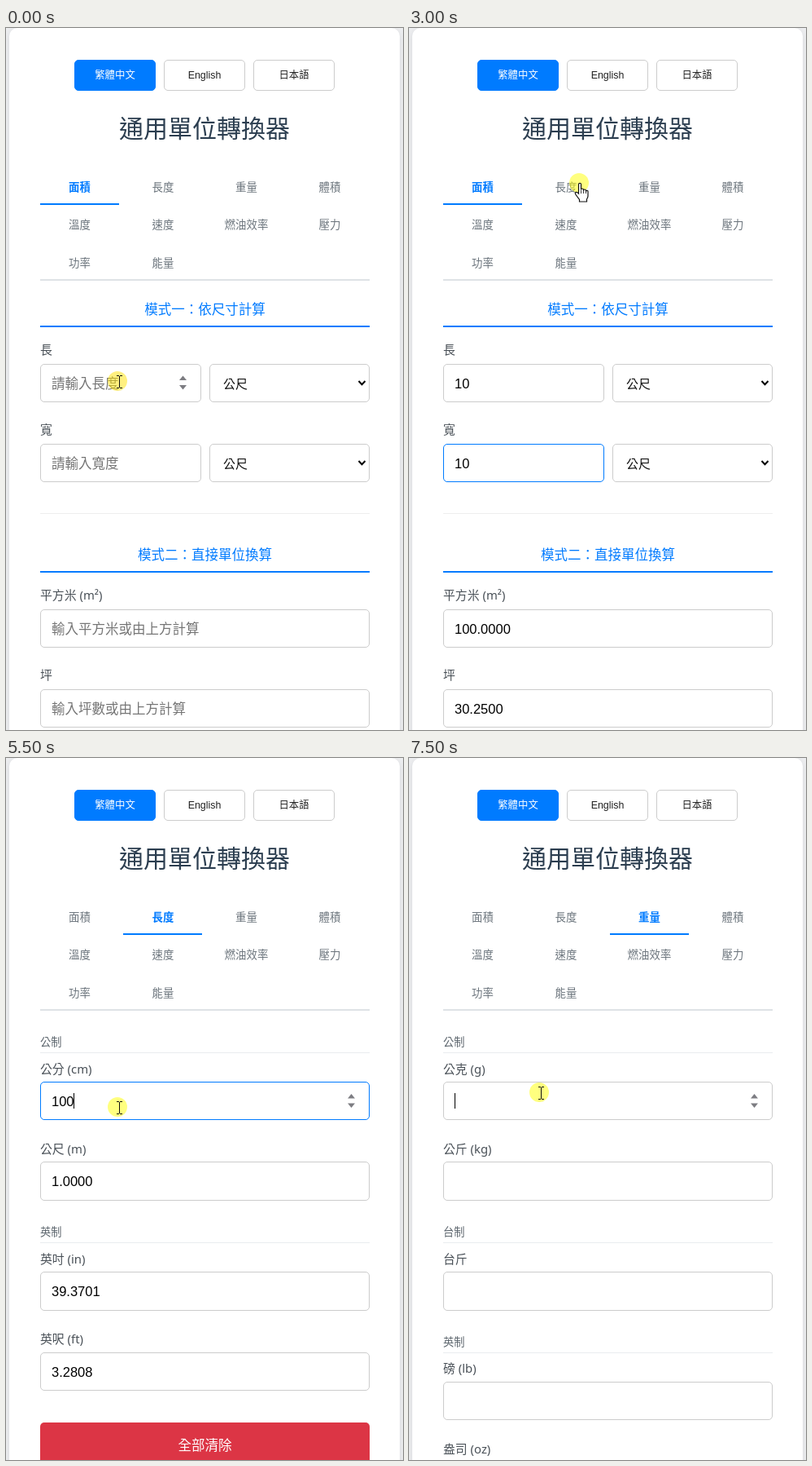
Write an HTML page with a canvas that moves like this. It is 488 by 861 pixels and loops after 8000 ms.

```html
<!DOCTYPE html>
<html lang="zh-Hant">
<head>
<meta charset="utf-8">
<title>通用單位轉換器</title>
<style>
html, body { margin: 0; width: 100%; height: 100%; overflow: hidden; background: #eeeff1; }
#stage { position: absolute; left: 0; top: 0; width: 488px; height: 861px; overflow: hidden; }
#card { position: absolute; left: 4px; top: 0; width: 480px; height: 900px; background: #fff;
  border-radius: 10px; box-shadow: 0 2px 10px rgba(0, 0, 0, .1); }
#page, canvas { position: absolute; left: 0; top: 0; width: 488px; height: 861px; }
#page div { position: absolute; box-sizing: border-box; }
#page .t { line-height: 30px; height: 30px; white-space: pre;
  font-family: "Noto Sans", "Noto Sans CJK TC", "Noto Sans CJK JP", "Noto Sans CJK", sans-serif; }
#page .n { font-family: "Liberation Sans", Arial, sans-serif; }
</style>
</head>
<body>
<div id="stage">
  <div id="card"></div>
  <div id="page"></div>
  <canvas width="488" height="861"></canvas>
</div>
<script>
const page = document.getElementById('page');
const ctx = document.querySelector('canvas').getContext('2d');
const BLUE = '#007bff', GREY = '#6c757d', LABEL = '#495057', LINE = '#ccc';
const STEP = 500, LOOP = 8000;
const NUM_FONT = '16.5px "Liberation Sans", Arial, sans-serif';

// One entry per half second. f: field with caret, hot: blue border, spin: field with spinner.
const steps = [
  { tab: 0, v: ['', ''], spin: 0, at: [139, 434], disc: '#ffe100' },
  { tab: 0, v: ['1', ''], f: 0, hot: 0, spin: 0, at: [139, 434] },
  { tab: 0, v: ['10', ''], f: 0, hot: 0, spin: 0, at: [139, 434] },
  { tab: 0, v: ['10', ''], f: 1, hot: 0, spin: 1, at: [102, 545], disc: '#ff0' },
  { tab: 0, v: ['10', '1'], f: 1, hot: 1, spin: 1, at: [102, 545] },
  { tab: 0, v: ['10', '10'], f: 1, hot: 1, spin: 1, at: [102, 545] },
  { tab: 0, v: ['10', '10'], hot: 1, at: [210, 190], disc: '#ff0', hand: true },
  { tab: 1, v: [''], f: 0, spin: 0, at: [131, 430], disc: '#ff0' },
  { tab: 1, v: [''], f: 0, hot: 0, spin: 0, at: [131, 430] },
  { tab: 1, v: ['10'], f: 0, hot: 0, spin: 0, at: [131, 430] },
  { tab: 1, v: ['100'], f: 0, hot: 0, spin: 0, at: [131, 430] },
  { tab: 1, v: ['100'], f: 0, hot: 0, spin: 0, at: [139, 429], disc: '#ff0' },
  { tab: 1, v: ['6'], f: 0, hot: 0, spin: 0, at: [150, 443] },
  { tab: 1, v: ['60'], f: 0, hot: 0, spin: 0, at: [150, 443] },
  { tab: 1, v: ['60'], f: 0, hot: 0, spin: 0, at: [301, 196], disc: '#ff0', hand: true },
  { tab: 2, v: [''], f: 0, spin: 0, at: [162, 411], disc: '#ff0' }
];

function add(css, text, cls) {
  const el = document.createElement('div');
  el.style.cssText = css;
  if (text) el.textContent = text;
  if (cls) el.className = cls;
  page.appendChild(el);
}

function rect(x, y, w, h, css) {
  add(`left:${x}px;top:${y}px;width:${w}px;height:${h}px;${css}`);
}

function text(x, cy, size, str, color, weight = 400, cls = '') {
  add(`left:${x}px;top:${cy - 15}px;font-size:${size}px;color:${color};font-weight:${weight}`, str, 't ' + cls);
}

function mid(cx, cy, size, str, color, weight = 400, cls = '') {
  add(`left:${cx - 150}px;width:300px;text-align:center;top:${cy - 15}px;` +
    `font-size:${size}px;color:${color};font-weight:${weight}`, str, 't ' + cls);
}

const label = (cy, str) => text(42, cy, 14.86, str, LABEL, 500);

function field(y, w, h, value, hint, hot) {
  rect(42, y, w, h, `border:1px solid ${hot ? BLUE : LINE};border-radius:5px`);
  const cy = y + 23.5;
  if (value) text(56, cy, 16.5, value, '#000', 400, 'n');
  else if (hint) text(56, cy, 16.5, hint, '#757575');
}

function select(y) {
  rect(250, y, 197, 47, `border:1px solid ${LINE};border-radius:5px`);
  text(267, y + 23.5, 14.9, '公尺', '#111');
  ctx.strokeStyle = '#000';
  ctx.lineWidth = 2;
  ctx.beginPath();
  ctx.moveTo(433.5, y + 21);
  ctx.lineTo(437.5, y + 25.2);
  ctx.lineTo(441.5, y + 21);
  ctx.stroke();
}

function group(cy, str) {
  text(42, cy, 13.2, str, '#5c656d', 400);
  rect(42, cy + 13.5, 405, 1, 'background:#e9ecef');
}

function section(cy, str) {
  mid(244.5, cy, 16.5, str, BLUE, 500);
  rect(42, cy + 20, 405, 2, 'background:' + BLUE);
}

function header(tab) {
  ['繁體中文', 'English', '日本語'].forEach((name, i) => {
    const x = 84 + i * 110;
    rect(x, 39, 100, 38, `border:1px solid ${i ? LINE : BLUE};border-radius:5px;background:${i ? '#fff' : BLUE}`);
    mid(x + 50, 58, 12.4, name, i ? '#222' : '#fff', 400, i === 1 ? 'n' : '');
  });
  mid(244, 123, 30, '通用單位轉換器', '#2c3e50', 500);
  const names = '面積 長度 重量 體積 溫度 速度 燃油效率 壓力 功率 能量'.split(' ');
  names.forEach((name, i) => {
    const on = i === tab;
    mid(90.5 + i % 4 * 102.5, 195 + Math.floor(i / 4) * 46.4, 13.4, name, on ? BLUE : GREY, on ? 700 : 400);
  });
  rect(42, 308, 405, 2, 'background:#dee2e6');
  rect(42 + Math.round(tab * 102.4), 215, 97, 2, 'background:' + BLUE);
}

const fixed = (n) => n ? n.toFixed(4) : '';

function area(s) {
  const size = s.v[0] * s.v[1];
  section(345, '模式一：依尺寸計算');
  label(394, '長');
  field(412, 198, 47, s.v[0], '請輸入長度', s.hot === 0);
  select(412);
  label(492, '寬');
  field(510, 198, 47, s.v[1], '請輸入寬度', s.hot === 1);
  select(510);
  rect(42, 595, 405, 1, 'background:#eee');
  section(646, '模式二：直接單位換算');
  label(695, '平方米 (m²)');
  field(713, 405, 47, fixed(size), '輸入平方米或由上方計算');
  label(793, '坪');
  field(811, 405, 47, fixed(size * 0.3025), '輸入坪數或由上方計算');
}

function metric(s, small, large) {
  group(347.5, '公制');
  label(380.5, small);
  field(397, 405, 47, s.v[0], '', s.hot === 0);
  label(478.5, large);
}

function distance(s) {
  const cm = +s.v[0];
  metric(s, '公分 (cm)', '公尺 (m)');
  field(495, 405, 48, fixed(cm / 100));
  group(580.5, '英制');
  label(613.5, '英吋 (in)');
  field(630, 405, 48, fixed(cm / 2.54));
  label(711.5, '英呎 (ft)');
  field(729, 405, 47, fixed(cm / 30.48));
  rect(42, 815, 405, 60, 'background:#dc3545;border-radius:5px');
  mid(244.5, 843, 16.5, '全部清除', '#fff', 500);
}

function weight(s) {
  metric(s, '公克 (g)', '公斤 (kg)');
  field(495, 405, 48);
  group(580.5, '台制');
  label(613.5, '台斤');
  field(630, 405, 48);
  group(715.5, '英制');
  label(747.5, '磅 (lb)');
  field(765, 405, 47);
  label(846.5, '盎司 (oz)');
}

function spinner(x, cy) {
  ctx.fillStyle = '#7d7d82';
  for (const d of [-1, 1]) {
    ctx.beginPath();
    ctx.moveTo(x - 4.5, cy + d * 3);
    ctx.lineTo(x + 4.5, cy + d * 3);
    ctx.lineTo(x, cy + d * 8.5);
    ctx.fill();
  }
}

function caret(str, cy) {
  ctx.font = NUM_FONT;
  ctx.fillStyle = '#000';
  ctx.fillRect(Math.floor(56 + ctx.measureText(str).width), Math.round(cy - 9.5), 1, 19);
}

function beam(x, y) {
  ctx.fillStyle = '#111';
  ctx.fillRect(x, y - 7, 1, 14);
  for (const dy of [-8, 7]) {
    ctx.fillRect(x - 3, y + dy, 3, 1);
    ctx.fillRect(x + 1, y + dy, 3, 1);
  }
}

const handPath = new Path2D('M-1.5 13V1.7Q-1.5 .3 0 .3T1.5 1.7V8.5Q1.5 7 3 7T4.5 8.5V9.5' +
  'Q4.5 8 6 8T7.5 9.5V10.5Q7.5 9.3 8.8 9.3T10 10.8V16Q10 18 8.5 20V23H-.5V20.5' +
  'L-5.3 14Q-6.3 12.5 -5 11.6Q-3.5 11 -1.5 13Z');

function pointer(s) {
  const [x, y] = s.at;
  if (s.disc) {
    ctx.globalAlpha = 0.5;
    ctx.fillStyle = s.disc;
    ctx.beginPath();
    ctx.arc(s.hand ? x - 1 : x - 2, s.hand ? y : y - 1, 12, 0, 7);
    ctx.fill();
    ctx.globalAlpha = 1;
  }
  if (!s.hand) return beam(x, y);
  ctx.save();
  ctx.translate(x, y);
  ctx.fillStyle = '#fff';
  ctx.strokeStyle = '#111';
  ctx.lineWidth = 1.2;
  ctx.fill(handPath);
  ctx.stroke(handPath);
  ctx.beginPath();
  for (const kx of [1.5, 4.5, 7.5]) {
    ctx.moveTo(kx, 9);
    ctx.lineTo(kx, 13);
  }
  ctx.lineWidth = 0.8;
  ctx.stroke();
  ctx.restore();
}

function render(s) {
  page.textContent = '';
  ctx.clearRect(0, 0, 488, 861);
  header(s.tab);
  [area, distance, weight][s.tab](s);
  const rowY = (i) => s.tab ? 420.5 : 435 + i * 98;
  if (s.spin !== undefined) spinner(s.tab ? 424.5 : 217.5, rowY(s.spin));
  if (s.f !== undefined) caret(s.v[s.f], rowY(s.f));
  pointer(s);
}

let shown = -1;
function tick() {
  const k = Math.floor(performance.now() % LOOP / STEP);
  if (k !== shown) render(steps[shown = k]);
  requestAnimationFrame(tick);
}
tick();
</script>
</body>
</html>
```
